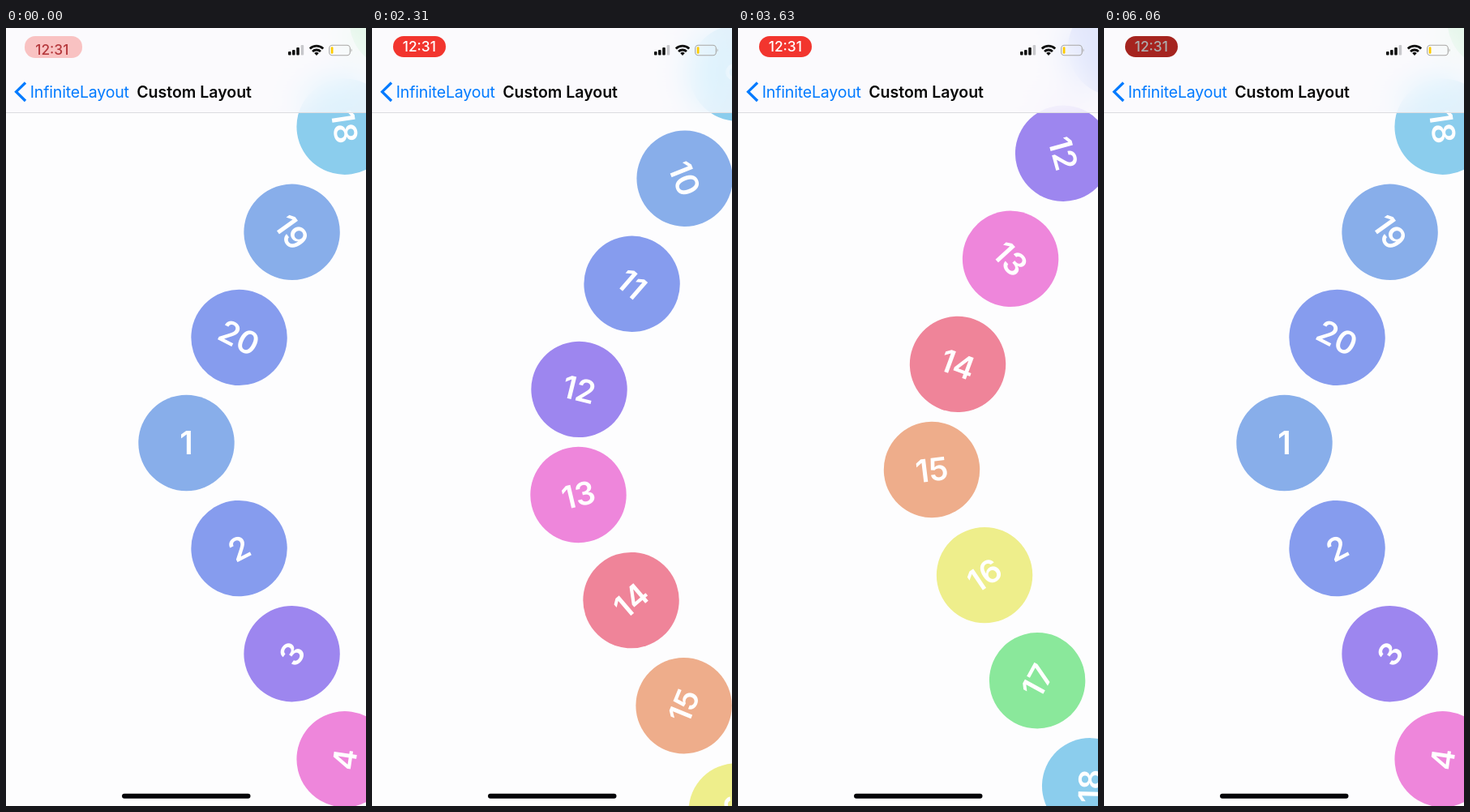
Write an HTML page that moves like this. It is 444 px wide and 960 px high and loops after 6.09 s.

```html
<!DOCTYPE html>
<html lang="en">
<head>
<meta charset="utf-8">
<title>Custom Layout</title>
<style>
  html, body { margin: 0; width: 100%; height: 100%; overflow: hidden; background: #fdfdfe; }
  svg { position: absolute; left: 0; top: 0; width: 444px; height: 960px; }
  text { font-family: Inter, Roboto, sans-serif; }
  #list text { font-size: 39px; font-weight: 600; fill: #fff; text-anchor: middle; }
  #bar {
    position: absolute; left: 0; top: 0; width: 444px; height: 104px;
    background: rgba(250, 249, 253, .8);
    backdrop-filter: saturate(1.8) blur(20px);
    border-bottom: 1px solid #dcdce0;
  }
  .title { font-size: 19.5px; }
  #clock { font-size: 17.3px; font-weight: 500; text-anchor: middle; }
</style>
</head>
<body>
<svg id="list" viewBox="0 0 444 960"></svg>
<div id="bar"></div>
<svg viewBox="0 0 444 960">
  <g id="badge">
    <rect id="pill" y="10" rx="13" fill="#f2352e"/>
    <text id="clock">12:31</text>
  </g>
  <g fill="#111">
    <rect x="348" y="29" width="3.6" height="4.5" rx="1"/>
    <rect x="353" y="27" width="3.6" height="6.5" rx="1"/>
    <rect x="358.2" y="24" width="3.6" height="9.5" rx="1"/>
    <rect x="363.6" y="21" width="3.6" height="12.5" rx="1" fill="#c8c8cc"/>
  </g>
  <g fill="none" stroke="#111" stroke-width="2.8">
    <path d="M374.8 25.4a11.8 11.8 0 0 1 16.4 0M378 29a7.2 7.2 0 0 1 10 0"/>
    <path d="M383 34l-2.8-2.9a4 4 0 0 1 5.6 0z" fill="#111" stroke="none"/>
  </g>
  <rect x="398.7" y="21.2" width="25.6" height="12.6" rx="3.8" fill="none" stroke="#a9a7a5" stroke-width="1.1"/>
  <rect x="400.7" y="23.2" width="2.8" height="8.6" rx="1.3" fill="#fc0"/>
  <path d="M425.6 25.3q2 2.2 0 4.4z" fill="#a9a7a5"/>
  <path d="M24 67.5L12.5 78.7 24 90" fill="none" stroke="#007aff" stroke-width="3.2"/>
  <text class="title" x="29.8" y="85.5" letter-spacing="-.17" fill="#007aff">InfiniteLayout</text>
  <text class="title" x="161.2" y="85.5" font-weight="600" fill="#080808">Custom Layout</text>
  <rect x="143" y="944.8" width="158.5" height="6" rx="3" fill="#050508"/>
</svg>
<script>
const LOOP = 6090, STEP = 30, COUNT = 20, PITCH = 130.1, MID = 512;
const colors = ['#88aeea', '#869cee', '#9d86ef', '#ee86db', '#ef8499',
                '#eead8b', '#eeee8b', '#8ae89b', '#8bcded'];
const $ = id => document.getElementById(id);
const clamp = v => Math.min(1, Math.max(0, v));
const set = (el, attrs) => { for (const k in attrs) el.setAttribute(k, attrs[k]); };

// Scroll position in items: [seconds, position]
const keys = [[0, 0], [.93, 8.762], [1.71, 22.392], [2.31, 31.508],
              [3.09, 45.104], [4.2, 59.158], [6.06, 60]];
const slope = (a, b) => (b[1] - a[1]) / (b[0] - a[0]);

// Central difference, limited so that the list never runs backwards
function speed(i) {
  const a = keys[i - 1], k = keys[i], b = keys[i + 1];
  return a && b ? Math.min(slope(a, b), 3 * slope(a, k), 3 * slope(k, b)) : 0;
}

function scrollAt(t) {
  const i = Math.max(1, keys.findIndex(k => k[0] >= t));
  const [t0, p0] = keys[i - 1], [t1, p1] = keys[i];
  const d = t1 - t0, u = (t - t0) / d, w = 1 - u;
  return w * w * ((1 + 2 * u) * p0 + u * d * speed(i - 1))
       + u * u * ((1 + 2 * w) * p1 - w * d * speed(i));
}

$('list').innerHTML = '<g><circle r="59.2"/><text y="14.2"></text></g>'.repeat(10);
const cells = [...$('list').children];

function drawList(t) {
  const pos = scrollAt(t), first = Math.floor(pos) - 4;
  cells.forEach((cell, i) => {
    const n = first + i, item = (n + COUNT) % COUNT, dy = (n - pos) * PITCH;
    const x = 222.5 + Math.abs(dy) / 2;
    set(cell, { transform: `translate(${x} ${MID + dy}) rotate(${-dy * .209})` });
    set(cell.firstChild, { fill: colors[item % colors.length] });
    cell.lastChild.textContent = item + 1;
  });
}

// The recording badge fades in at the start and is pressed at the end
function drawBadge(t) {
  const pale = clamp(1 - t / .3), pressed = clamp((t - 5.75) / .31);
  set($('pill'), { x: 26 - 3 * pale, width: 65 + 6 * pale, height: 26 + pale,
                   'fill-opacity': 1 - .72 * pale });
  set($('clock'), { x: 58.3 - 1.5 * pale, y: 29.2 + 4 * pale,
                    fill: `rgb(${255 - 74 * pale}, ${255 - 199 * pale}, ${255 - 195 * pale})` });
  $('badge').style.filter = `brightness(${1 - .32 * pressed})`;
}

function frame() {
  const ms = performance.now() % LOOP;
  const t = Math.floor(ms / STEP) * STEP / 1000;
  drawList(t);
  drawBadge(t);
  requestAnimationFrame(frame);
}
frame();
</script>
</body>
</html>
```
